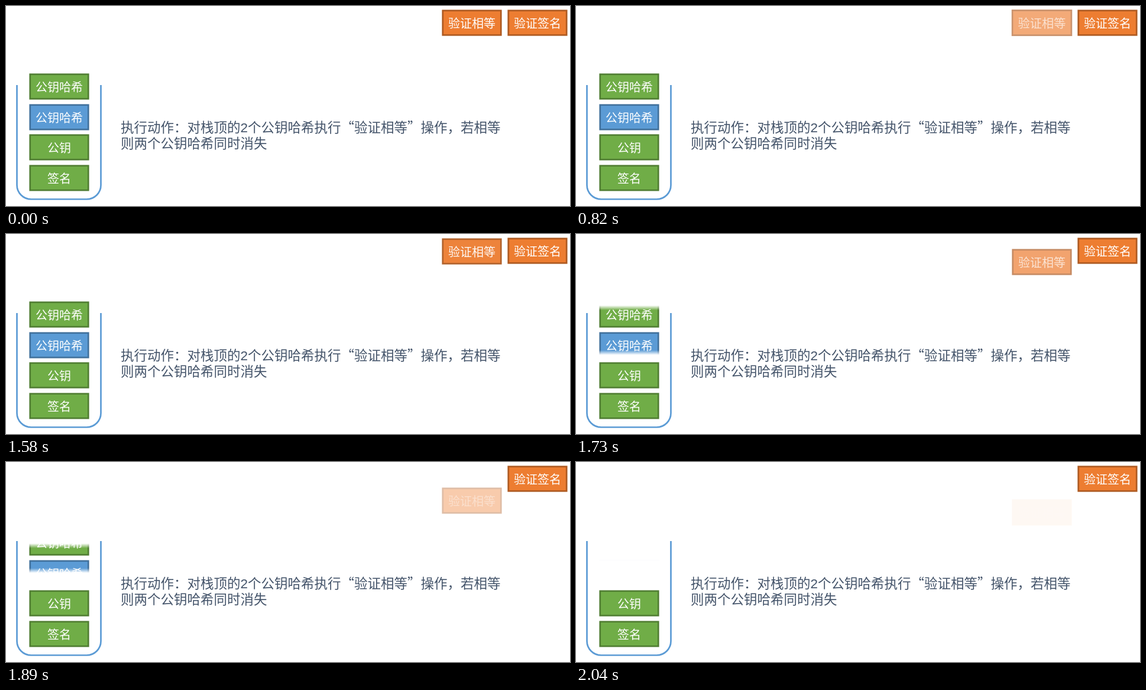
Animation of 954 by 339 pixels, one loop 4850 ms. Source, as an HTML page:

```html
<!DOCTYPE html>
<html lang="zh-CN">
<head>
<meta charset="utf-8">
<title>验证相等</title>
<style>
@property --k { syntax: "<number>"; inherits: true; initial-value: 0; }
@property --a { syntax: "<number>"; inherits: true; initial-value: 1; }

html, body {
  margin: 0;
  width: 100%;
  height: 100%;
  overflow: hidden;
  background: #fff;
}
body {
  font-family: "Noto Sans CJK SC", "Noto Sans CJK", sans-serif;
  font-weight: 300;
  text-spacing-trim: space-all;
}
#stage {
  position: relative;
  width: 954px;
  height: 339px;
  overflow: hidden;
  animation: wipe 4850ms step-end infinite;
}
#stage > * { position: absolute; }

.box {
  width: 102px;
  height: 45px;
  font-size: 20px;
}
.box rect {
  x: 1.75px;
  y: 1.75px;
  width: 98.5px;
  height: 41.5px;
  fill: var(--fill);
  stroke: var(--edge);
  stroke-width: 2.7px;
}
.box text {
  fill: rgb(255 255 255 / var(--a));
  text-anchor: middle;
}
.green { --fill: #70ad47; --edge: #507e32; left: 39px; }
.blue { --fill: #5b9bd5; --edge: #41719c; left: 39px; }
.orange { --fill: #ed7d31; --edge: #ae5a21; top: 6px; }

.note {
  left: 194px;
  top: 191px;
  color: #44546a;
  font-size: 22.5px;
  line-height: 27px;
  white-space: nowrap;
}
.note span {
  font-family: "Liberation Sans", Arial, sans-serif;
  font-weight: 400;
  line-height: 0;
}

/* soft edge travels 8.5px per step, down one box and up the other */
.wipe-down, .wipe-up {
  --p: calc((var(--k) * 8.5 - var(--lag)) * 1px);
  mask-image: linear-gradient(var(--dir), #0000 calc(var(--p) - 4px), #000 calc(var(--p) + 4px));
}
.wipe-down { --dir: to bottom; --lag: 6; }
.wipe-up { --dir: to top; --lag: 7; }

.op {
  opacity: var(--a);
  animation: op 4850ms step-end infinite;
}

@keyframes wipe {
  0%, 32.576% { --k: 0; }
  34.226% { --k: 1; }
  35.670% { --k: 2; }
  37.319% { --k: 3; }
  38.969% { --k: 4; }
  40.412% { --k: 5; }
  42.061%, 100% { --k: 6.5; }
}

/* two pulses, then sink and fade */
@keyframes op {
  0%, 14.020%, 21.443% { --a: 1; transform: none; }
  9.896%, 16.907% { --a: .65; transform: scale(1.015); }
  11.752%, 19.175% { --a: .5; transform: scale(1.04); }
  32.576% { --a: .95; transform: translateY(1px); }
  34.226% { --a: .83; transform: translateY(10px); }
  35.670% { --a: .7; transform: translateY(19px); }
  37.319% { --a: .55; transform: translateY(28px); }
  38.969% { --a: .4; transform: translateY(37px); }
  40.412% { --a: .23; transform: translateY(47px); }
  42.061%, 100% { --a: .055; transform: translateY(57px); }
}
.op rect { animation: edge 4850ms step-end infinite; }
@keyframes edge {
  0% { stroke: var(--edge); }
  42.061%, 100% { stroke: var(--fill); }
}
</style>
</head>
<body>
<div id="stage">
  <svg width="180" height="339" style="left:0;top:0">
    <path d="M18.5 134V303.5A24 24 0 0 0 42.5 327.5H136.5A24 24 0 0 0 160.5 303.5V134" fill="none" stroke="#5b9bd5" stroke-width="2.7"/>
  </svg>
  <svg class="box green wipe-down" style="top:114px"><rect/><text x="51" y="30.5">公钥哈希</text></svg>
  <svg class="box blue wipe-up" style="top:166px"><rect/><text x="51" y="30.5">公钥哈希</text></svg>
  <svg class="box green" style="top:217px"><rect/><text x="51" y="30.5">公钥</text></svg>
  <svg class="box green" style="top:269px"><rect/><text x="51" y="30.5">签名</text></svg>
  <svg class="box orange op" style="left:737px"><rect/><text x="51" y="30.5">验证相等</text></svg>
  <svg class="box orange" style="left:848px"><rect/><text x="51" y="30.5">验证签名</text></svg>
  <div class="note">执行动作：对栈顶的<span>2</span>个公钥哈希执行“验证相等”操作，若相等<br>则两个公钥哈希同时消失</div>
</div>
</body>
</html>
```
